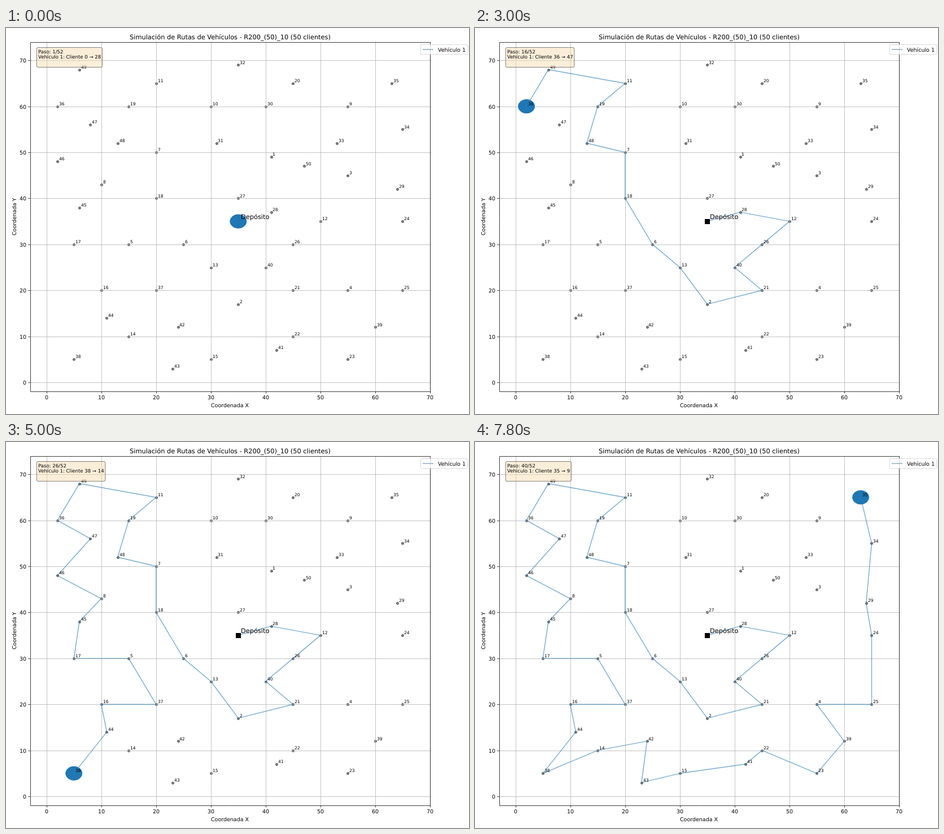
Write an HTML page with a canvas that moves like this. It is 820x683 px and loops after 8 s.

```html
<!DOCTYPE html>
<html lang="es">
<head>
<meta charset="utf-8">
<title>Simulación de Rutas</title>
<style>
  html, body { margin: 0; width: 100%; height: 100%; overflow: hidden; background: #fff; }
  canvas { display: block; width: 820px; height: 683px; }
</style>
</head>
<body>
<canvas id="plot" width="820" height="683"></canvas>
<script>
const ctx = document.getElementById('plot').getContext('2d');

const PT = 820 / 12 / 72; // pixels per point on a 12 inch wide figure
const LEFT = 42.6, RIGHT = 751, TOP = 24.7, BOTTOM = 643.3;
const MID_X = (LEFT + RIGHT) / 2, MID_Y = (TOP + BOTTOM) / 2;
const BLUE = '#1f77b4', ROUTE_BLUE = 'rgba(31,119,180,0.6)';
const STEP_MS = 200, STEPS = 40, TOTAL = 52;

// Key points: the depot, then the clients in the order of their labels.
const SITES = [
  [35, 35], [41, 49], [35, 17], [55, 45], [55, 20], [15, 30], [25, 30], [20, 50], [10, 43],
  [55, 60], [30, 60], [20, 65], [50, 35], [30, 25], [15, 10], [30, 5], [10, 20], [5, 30],
  [20, 40], [15, 60], [45, 65], [45, 20], [45, 10], [55, 5], [65, 35], [65, 20], [45, 30],
  [35, 40], [41, 37], [64, 42], [40, 60], [31, 52], [35, 69], [53, 52], [65, 55], [63, 65],
  [2, 60], [20, 20], [5, 5], [60, 12], [40, 25], [42, 7], [24, 12], [23, 3], [11, 14],
  [6, 38], [2, 48], [8, 56], [13, 52], [6, 68], [47, 47]
];
// The turns of the trip; clients close to a leg are served on the way.
const TURNS = [
  0, 12, 40, 21, 2, 18, 7, 48, 11, 49, 36, 47, 46, 8, 17,
  5, 37, 16, 44, 38, 42, 43, 22, 23, 39, 4, 25, 35, 9
];
const REACH = 2.1;

function servedBetween(from, to) {
  const [ax, ay] = SITES[from], [bx, by] = SITES[to];
  const dx = bx - ax, dy = by - ay, length = Math.hypot(dx, dy);
  return SITES
    .map(([x, y], id) => ({
      id,
      along: ((x - ax) * dx + (y - ay) * dy) / length,
      off: Math.abs((x - ax) * dy - (y - ay) * dx) / length
    }))
    .filter(s => !TURNS.includes(s.id) && s.along > 0 && s.along < length && s.off < REACH)
    .sort((a, b) => a.along - b.along)
    .map(s => s.id);
}

const ROUTE = TURNS.flatMap((id, i) => i ? [...servedBetween(TURNS[i - 1], id), id] : [id]);

const unitX = (RIGHT - LEFT) / 73, unitY = (BOTTOM - TOP) / 76;
const toX = v => LEFT + (v + 3) * unitX;
const toY = v => BOTTOM - (v + 2) * unitY;
const place = id => [toX(SITES[id][0]), toY(SITES[id][1])];
const snap = v => Math.round(v) + 0.5;

function setFont(size) {
  ctx.font = `${size * PT}px "DejaVu Sans", sans-serif`;
  ctx.textRendering = 'geometricPrecision';
}

// anchor: 0 = left, 0.5 = centre, 1 = right; text sits on whole pixels.
function text(str, x, y, size, anchor = 0) {
  setFont(size);
  ctx.fillStyle = '#000';
  const width = ctx.measureText(str).width;
  ctx.fillText(str, Math.round(x - anchor * width), Math.round(y) + 1);
}

function line(points, color, width) {
  ctx.beginPath();
  for (const [x, y] of points) ctx.lineTo(x, y);
  ctx.strokeStyle = color;
  ctx.lineWidth = width * PT;
  ctx.stroke();
}

function paint(fill, edge = fill) {
  ctx.fillStyle = fill;
  ctx.strokeStyle = edge;
  ctx.lineWidth = PT;
  ctx.fill();
  ctx.stroke();
}

function roundBox(x, y, w, h, r, fill, edge) {
  ctx.beginPath();
  ctx.roundRect(x, y, w, h, r);
  paint(fill, edge);
}

function drawDots() {
  for (let id = 1; id < SITES.length; id++) {
    const [x, y] = place(id);
    ctx.beginPath();
    ctx.arc(snap(x), snap(y), Math.sqrt(20) / 2 * PT, 0, 2 * Math.PI);
    paint('rgba(0,0,0,0.5)');
  }
}

function drawGrid() {
  const tick = 3.5 * PT;
  for (let v = 0; v <= 70; v += 10) {
    const x = snap(toX(v)), y = snap(toY(v));
    line([[x, TOP], [x, BOTTOM]], '#b0b0b0', 0.8);
    line([[LEFT, y], [RIGHT, y]], '#b0b0b0', 0.8);
    line([[x, BOTTOM], [x, BOTTOM + tick]], '#000', 0.8);
    line([[LEFT - tick, y], [LEFT, y]], '#000', 0.8);
    text(v, toX(v), BOTTOM + 13, 10, 0.5);
    text(v, LEFT - 2 * tick, toY(v) + 3, 10, 1);
  }
}

function drawFrame() {
  ctx.strokeStyle = '#000';
  ctx.lineWidth = 0.8 * PT;
  ctx.strokeRect(snap(LEFT), snap(TOP), snap(RIGHT) - snap(LEFT), snap(BOTTOM) - snap(TOP));

  text('Simulación de Rutas de Vehículos - R200_(50)_10 (50 clientes)', MID_X, TOP - 6 * PT, 12, 0.5);
  text('Coordenada X', MID_X, 670, 10, 0.5);
  ctx.save();
  ctx.translate(17, Math.round(MID_Y));
  ctx.rotate(-Math.PI / 2);
  text('Coordenada Y', 0, 0, 10, 0.5);
  ctx.restore();
}

function drawVehicle(step) {
  line(ROUTE.slice(0, step).map(place), ROUTE_BLUE, 1.5);

  const [x, y] = place(0);
  ctx.fillStyle = '#000';
  ctx.fillRect(snap(x) - 4.5, snap(y) - 4.5, 9, 9);

  ctx.beginPath();
  ctx.ellipse(...place(ROUTE[step - 1]), 1.5 * unitX, 1.5 * unitY, 0, 0, 2 * Math.PI);
  paint(BLUE);
}

function drawLabels() {
  SITES.forEach((_, id) => {
    const [x, y] = place(id);
    if (id) text(id, x + 3 * PT, y - 3 * PT, 8);
    else text('Depósito', x + 5 * PT, y - 5 * PT, 12);
  });
}

function drawInfo(step) {
  const x = LEFT + 0.02 * (RIGHT - LEFT), y = TOP + 0.02 * (BOTTOM - TOP);
  const pad = 2.7 * PT;
  const move = `Vehículo 1: Cliente ${ROUTE[step - 1]} → ${ROUTE[step]}`;
  setFont(9);
  const width = ctx.measureText(move).width;
  roundBox(x - pad, y - pad, width + 2 * pad, 29.8 + 2 * pad, pad,
    'rgba(245,222,179,0.5)', 'rgba(0,0,0,0.5)');
  text(`Paso: ${step}/${TOTAL}`, x, 44, 9);
  text(move, x, 53, 9);
}

function drawLegend() {
  roundBox(734.3, 29.3, 83.8, 17.4, 2 * PT, 'rgba(255,255,255,0.8)', 'rgba(204,204,204,0.8)');
  line([[738, 38], [757, 38]], '#84a5ba', 1.5);
  text('Vehículo 1', 764.6, 40.6, 10);
}

function draw(step) {
  ctx.fillStyle = '#fff';
  ctx.fillRect(0, 0, 820, 683);
  ctx.lineJoin = 'round';
  drawDots();
  drawGrid();
  drawVehicle(step);
  drawFrame();
  drawLabels();
  drawInfo(step);
  drawLegend();
}

const start = performance.now();
function tick() {
  const elapsed = Math.max(0, performance.now() - start);
  draw(Math.floor(elapsed / STEP_MS) % STEPS + 1);
  requestAnimationFrame(tick);
}
tick();
</script>
</body>
</html>
```
